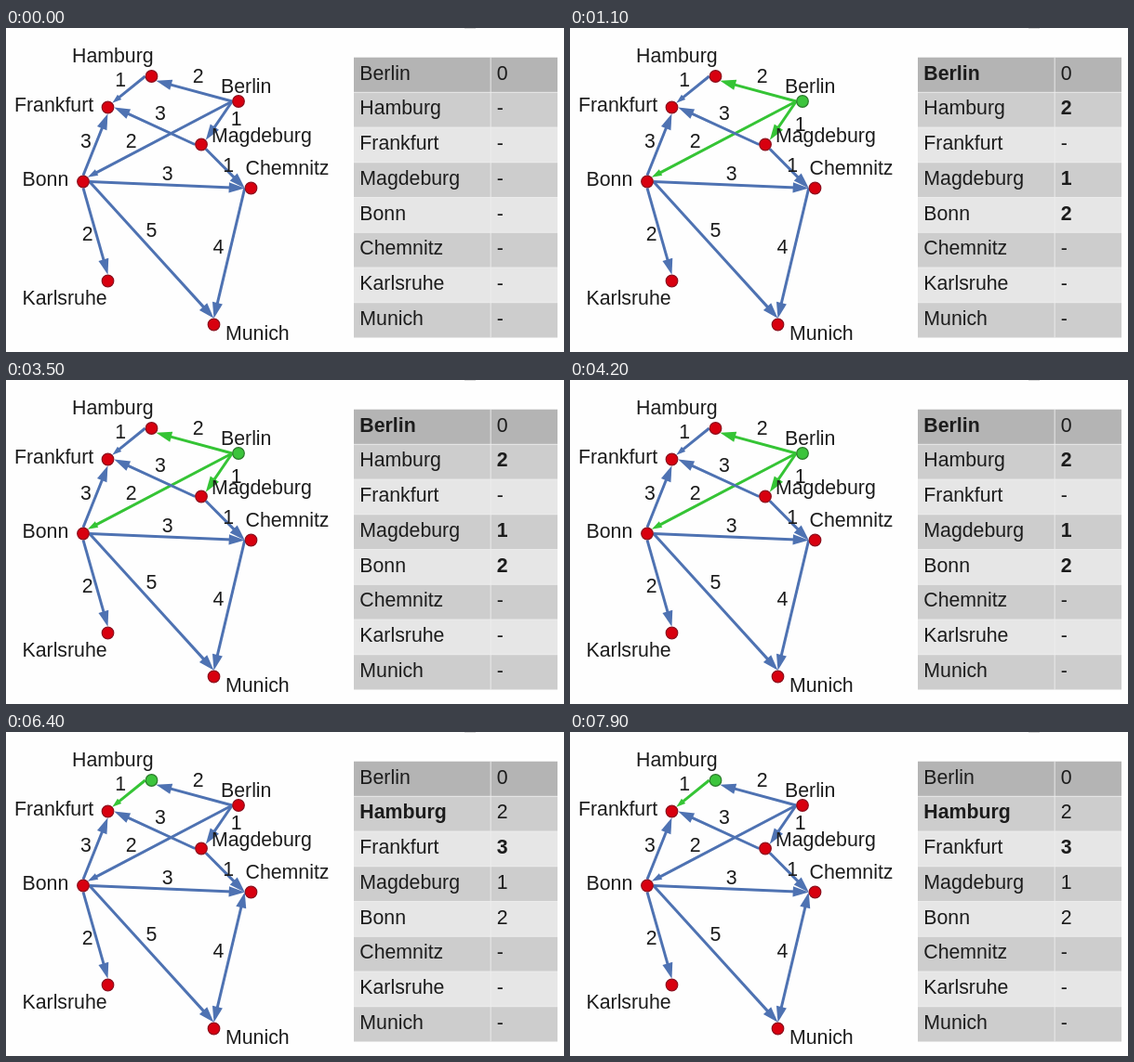
Recreate the animation shown at these times as an HTML page. Size 600 px wide and 349 px high, loop 8000 ms.

```html
<!DOCTYPE html>
<html>
<head>
<meta charset="utf-8">
<style>
html, body { margin: 0; width: 100%; height: 100%; overflow: hidden; background: #fefefe; }
svg { display: block; font: 21.3px "Liberation Sans", Arial, sans-serif; fill: #1c1c1c; }
.bold { font-weight: bold; }
</style>
</head>
<body>
<svg id="stage" width="600" height="349" viewBox="0 0 600 349"></svg>
<script>
const BLUE = '#4e72b2', GREEN = '#35c435';
const PORTS = ['E', 'SE', 'S', 'SW', 'W', 'NW', 'N', 'NE'];

// node x, y, label x, baseline
const cities = {
  Berlin: [250, 79, 231, 69.5],
  Hamburg: [156.5, 52, 71, 37],
  Frankfurt: [109.5, 85.5, 9, 89.5],
  Magdeburg: [210, 125.5, 221, 122.5],
  Bonn: [83, 165.5, 17.5, 169.5],
  Chemnitz: [263.5, 172.5, 257.5, 157.5],
  Karlsruhe: [109.5, 272.5, 17.5, 298],
  Munich: [223.5, 319.5, 236, 336]
};
const names = Object.keys(cities);

// gap: distance of the weight from the line; along: its place on the line
const edge = (from, out, to, into, weight, gap, { along = .5, head = 17, slip = 0 } = {}) =>
  ({ from, out, to, into, weight, gap, along, head, slip });

const edges = [
  edge('Berlin', 'W', 'Hamburg', 'SE', 2, -17),
  edge('Berlin', 'W', 'Magdeburg', 'NE', 1, 14, { along: .25, slip: 6 }),
  edge('Berlin', 'W', 'Bonn', 'NE', 2, -13, { along: .66, head: 11 }),
  edge('Hamburg', 'W', 'Frankfurt', 'NE', 1, -14, { head: 10 }),
  edge('Magdeburg', 'W', 'Frankfurt', 'E', 3, -15),
  edge('Magdeburg', 'SE', 'Chemnitz', 'W', 1, 5),
  edge('Bonn', 'N', 'Frankfurt', 'S', 3, 11),
  edge('Bonn', 'E', 'Chemnitz', 'W', 3, 13),
  edge('Bonn', 'S', 'Karlsruhe', 'N', 2, -9),
  edge('Bonn', 'E', 'Munich', 'N', 5, 14, { along: .42 }),
  edge('Chemnitz', 'W', 'Munich', 'N', 4, -13, { along: .47 })
];

// Settle one city: shorten the distances of its neighbours
function settle(dist, active) {
  const next = { ...dist };
  for (const { from, to, weight } of edges)
    if (from === active) next[to] = Math.min(next[to] ?? Infinity, dist[from] + weight);
  return next;
}

const steps = [{ at: 0, dist: { Berlin: 0 }, before: { Berlin: 0 } }];
for (const [at, active] of [[500, 'Berlin'], [6400, 'Hamburg']]) {
  const before = steps[steps.length - 1].dist;
  steps.push({ at, active, before, dist: settle(before, active) });
}

const text = (s, x, y, bold, anchor = 'start') =>
  `<text x="${x}" y="${y}" text-anchor="${anchor}"${bold ? ' class="bold"' : ''}>${s}</text>`;

const rect = (x, y, w, h, fill) =>
  `<rect x="${x}" y="${y}" width="${w}" height="${h}" fill="${fill}"/>`;

function port(city, side) {
  const [x, y] = cities[city], a = PORTS.indexOf(side) * Math.PI / 4;
  return [x + 6.8 * Math.cos(a), y + 6.8 * Math.sin(a)];
}

const arrowhead = (x, length, flip) =>
  `<path d="M${x} 0l${flip * length} ${-length * .33}v${length * .66}z"/>`;

function drawEdge(e, active, twoWay) {
  const [x1, y1] = port(e.from, e.out), [x2, y2] = port(e.to, e.into);
  const length = Math.hypot(x2 - x1, y2 - y1);
  const ux = (x2 - x1) / length, uy = (y2 - y1) / length;
  const start = twoWay ? e.head * .8 : 0, end = length - e.head * .8;
  const line = `<g fill="${active ? GREEN : BLUE}" transform="matrix(${ux} ${uy} ${-uy} ${ux} ${x1} ${y1})">` +
    rect(start, -1.5, end - start, 3) + arrowhead(length, e.head, -1) +
    (twoWay ? arrowhead(0, e.head, 1) : '') + '</g>';
  const x = x1 + ux * length * e.along + uy * e.gap;
  const y = y1 + uy * length * e.along - ux * e.gap + (active ? e.slip : 0);
  return line + text(e.weight, x, y + 7.5, false, 'middle');
}

function graph({ active }) {
  const lines = edges.map(e =>
    drawEdge(e, e.from === active, active === 'Hamburg' && e.from === 'Chemnitz'));
  const nodes = names.map(name => {
    const [x, y, labelX, labelY] = cities[name];
    const [fill, rim] = name === active ? ['#3cc43c', '#2b7a2b'] : ['#d8000f', '#8c0d1c'];
    return `<circle cx="${x}" cy="${y}" r="6.3" fill="${fill}" stroke="${rim}" stroke-width="1.2"/>` +
      text(name, labelX, labelY);
  });
  return lines.join('') + nodes.join('');
}

function table({ active, dist, before }) {
  const top = 31.5, row = 37.75;
  const rows = names.map((name, i) => {
    const y = top + i * row, base = y + 24;
    const fill = i === 0 ? '#b4b4b4' : i % 2 ? '#cdcdcd' : '#e6e6e6';
    return rect(374, y, 219, row, fill) + rect(374, y - .4, 219, .8, '#ededed') +
      text(name, 380.3, base, name === active) +
      text(dist[name] ?? '-', 527.7, base, dist[name] !== before[name]);
  });
  return rows.join('') + rect(520.7, top, .9, 8 * row, '#ededed');
}

const stage = document.getElementById('stage');
let shown;

function frame(now) {
  const step = steps.filter(s => s.at <= now % 8000).pop();
  if (step !== shown) {
    shown = step;
    stage.innerHTML = rect(493, 0, 12, 1, '#dcdcdc') + graph(step) + table(step);
  }
  requestAnimationFrame(frame);
}
frame(0);
</script>
</body>
</html>
```
